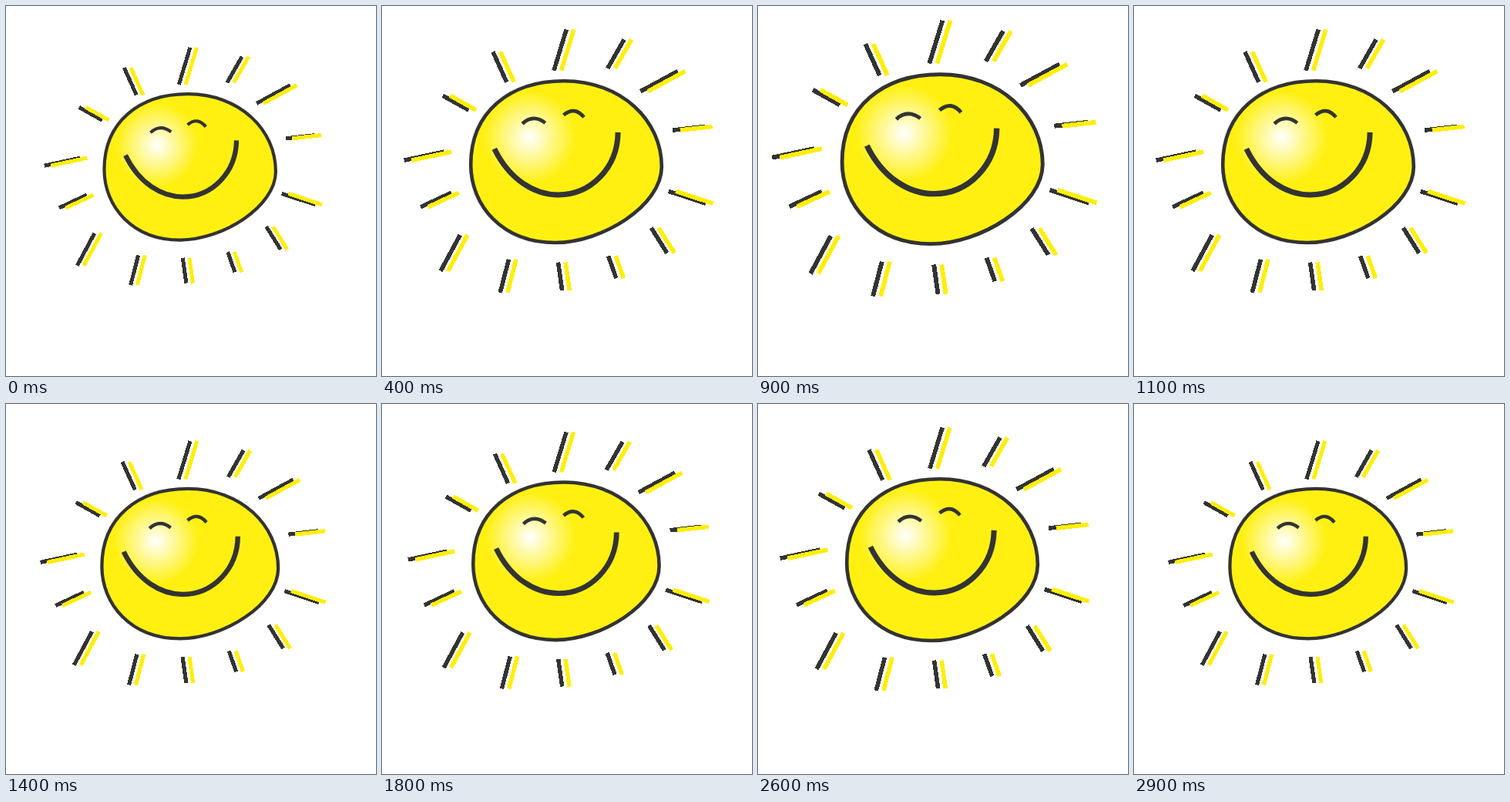
These frames come from a looping animation (480 px wide and 480 px high, 3000 ms). An HTML page:

```html
<!DOCTYPE html>
<html lang="en">
<head>
<meta charset="utf-8">
<title>Smiling sun</title>
<style>
  html, body { margin: 0; width: 100%; height: 100%; overflow: hidden; background: #fff; }
  svg { display: block; width: 100vw; height: 100vh; }
  .ink { fill: none; stroke: #333; }
  .rays { fill: none; stroke-width: 6; shape-rendering: crispEdges; }
</style>
</head>
<body>
<svg viewBox="0 0 480 480">
  <defs>
    <radialGradient id="glow" gradientUnits="userSpaceOnUse" cx="188" cy="163" r="64">
      <stop offset="0" stop-color="#fff"/>
      <stop offset="1" stop-color="#fff012"/>
    </radialGradient>
  </defs>
  <g id="sun">
    <path id="shade" class="rays" stroke="#333"/>
    <path id="light" class="rays" stroke="#ffee08" transform="translate(10.3 0)"/>
    <path fill="url(#glow)" stroke="#333" stroke-width="5"
      d="M236 84.5C316 84.5 372.5 139 372.5 204C372.5 258 290 309.5 224 309.5C150 309.5 106 258 106 201C106 128 160 84.5 236 84.5Z"/>
    <path class="ink" stroke-width="7.5" d="M139 179C160 222 195 243 228 243C274 243 311 205 311.5 156"/>
    <path class="ink" stroke-width="5" d="M178 144Q193 130 210 143M235.500 132Q251 119 264 135"/>
  </g>
</svg>
<script>
  const rays = [
    [239.5, 13, 222, 70], [320, 27, 297, 67], [395, 71, 343, 99],
    [388, 153, 433, 148], [382, 238, 434, 255], [358, 289, 380, 324],
    [298, 328, 309, 359], [228, 337, 233.5, 376], [159, 333, 147, 379],
    [91, 299, 64, 349], [36, 260, 79, 240], [13, 195, 69, 183],
    [67, 105, 103, 125], [137, 44, 156, 86]
  ];
  const d = rays.map(([x1, y1, x2, y2]) => `M${x1} ${y1}L${x2} ${y2}`).join("");
  shade.setAttribute("d", d);
  light.setAttribute("d", d);

  // Seven growth steps, a short hold, seven steps back; two pulses per loop.
  const STEP = 100, PULSE = 15, PEAK = 7;
  const CX = 235.7, CY = 272;
  const start = performance.now();

  function draw() {
    const tick = Math.floor((performance.now() - start) / STEP) % PULSE;
    const below = PEAK - Math.min(tick, PULSE - tick, PEAK);
    const sx = 1 - below * 0.0236, sy = 1 - below * 0.0226;
    sun.setAttribute("transform",
      `translate(${CX} ${CY}) scale(${sx} ${sy}) translate(${-CX} ${-CY})`);
    requestAnimationFrame(draw);
  }
  draw();
</script>
</body>
</html>
```
